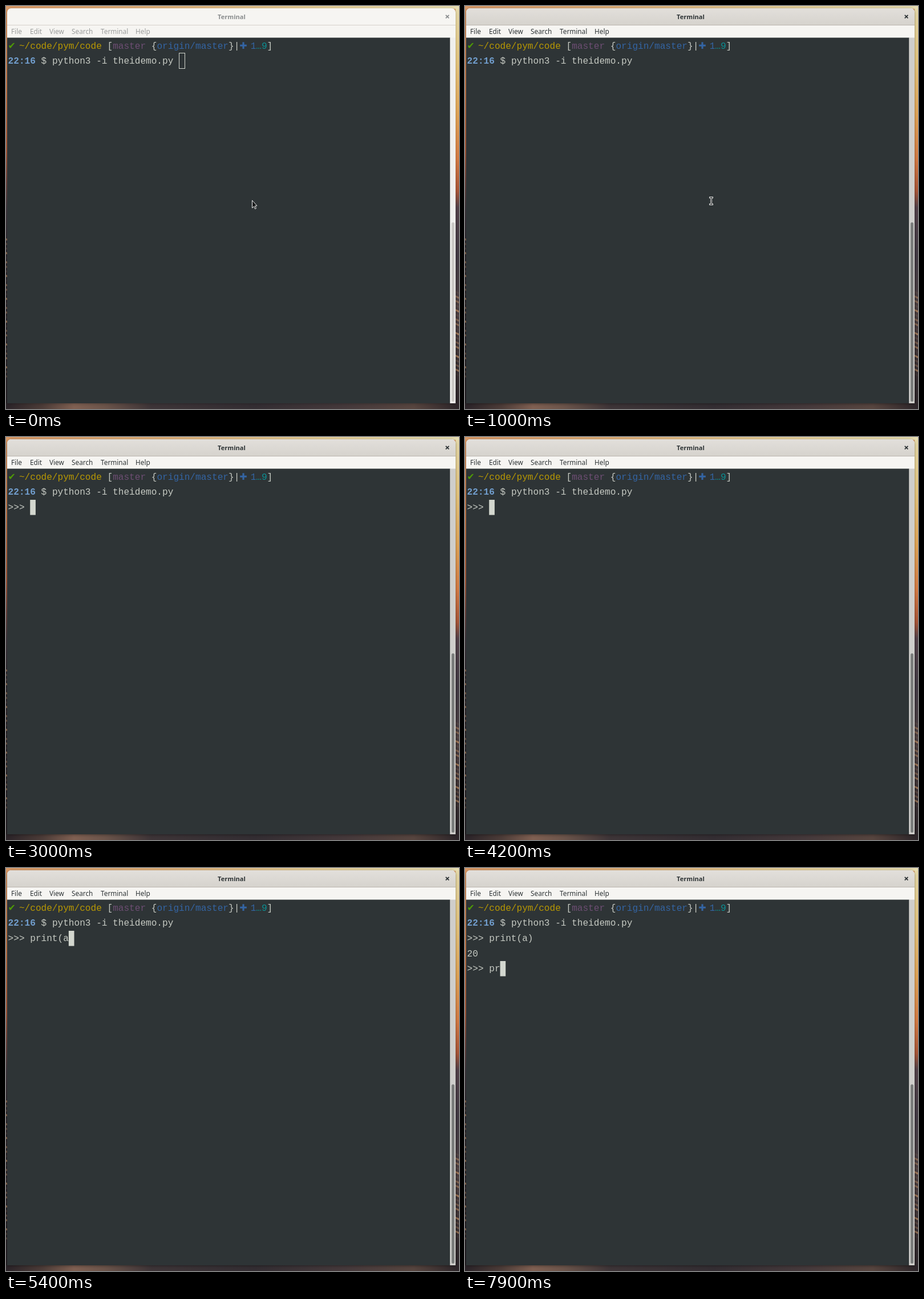
These frames come from a looping animation (794x706 px, 8000 ms). An HTML page with a canvas:

```html
<!DOCTYPE html>
<html lang="en">
<head>
<meta charset="utf-8">
<title>Terminal</title>
<style>
html, body { margin: 0; width: 100%; height: 100%; overflow: hidden; background: #2e3436; }
canvas { display: block; }
</style>
</head>
<body>
<canvas id="stage" width="794" height="706"></canvas>
<script>
const ctx = document.getElementById('stage').getContext('2d');
const W = 794, H = 706, LOOP = 8000;
const CELL = 9.66, LEFT = 3.6, PITCH = 26.67;
const MONO = '16.1px "Liberation Mono", monospace';
const UI = '"Noto Sans", "Open Sans", sans-serif';
const FG = '#c6cac3', CURSOR = '#d3d7cf', BLUE = '#3465a4';

// Time, text typed at the prompt, cursor visible
const STEPS = [
  [1900, '', 1], [2400, '', 0], [3000, '', 1], [3600, '', 0], [4200, '', 1],
  [4400, 'p', 1], [4500, 'pri', 1], [4700, 'prin', 1], [4800, 'print', 1],
  [5000, 'print(', 1], [5400, 'print(a', 1], [5900, 'print(a)', 1],
  [6400, '', 1], [7000, '', 0], [7700, '', 1], [7800, 'p', 1], [7900, 'pr', 1]
];

const colX = c => LEFT + c * CELL;
const rowTop = r => Math.round(56.5 + r * PITCH);
const mix = (a, b, k) => `rgb(${a.map((v, i) => Math.round(v + (b[i] - v) * k))})`;

function rect(x, y, w, h, fill) {
  ctx.fillStyle = fill;
  ctx.fillRect(x, y, w, h);
}

function gradient(x0, y0, x1, y1, stops) {
  const g = ctx.createLinearGradient(x0, y0, x1, y1);
  stops.forEach(([at, color]) => g.addColorStop(at, color));
  return g;
}

function label(str, x, y, font, color, align = 'left') {
  ctx.font = font;
  ctx.fillStyle = color;
  ctx.textAlign = align;
  ctx.fillText(str, x, y);
}

function put(col, row, str, color = FG, font = MONO) {
  label(str, colX(col), Math.round(74.6 + row * PITCH), font, color);
}

// Slanted glints on the water along a side strip
function glints(x, y0, y1) {
  ctx.lineWidth = 3;
  ctx.strokeStyle = '#b98a62';
  for (let y = y0; y < y1; y += 8) {
    ctx.globalAlpha = .4 + .35 * Math.sin(y * .31);
    ctx.beginPath();
    ctx.moveTo(x - 1, y);
    ctx.lineTo(x + 7, y + 4);
    ctx.stroke();
  }
  ctx.globalAlpha = 1;
}

function wallpaper() {
  rect(0, 0, W, H, gradient(0, 0, 0, H, [
    [0, '#dc9a66'], [.2, '#d8824e'], [.36, '#b9623f'], [.43, '#7c4a42'],
    [.5, '#443a42'], [.6, '#2c272e'], [1, '#241f24']]));
  rect(788, 0, 6, H, gradient(0, 0, 0, H, [
    [0, '#e8dcac'], [.14, '#e8c87e'], [.27, '#e4a656'], [.38, '#d87c44'],
    [.46, '#ab5638'], [.5, '#54424a'], [.62, '#423a44'], [.75, '#4a3e40'], [1, '#2b2428']]));
  rect(0, 0, W, 5, gradient(0, 0, W, 0, [
    [0, '#d99a68'], [.35, '#e0b17a'], [.7, '#e6cf98'], [1, '#e8deb2']]));
  rect(0, 696, W, 10, gradient(0, 0, W, 0, [
    [0, '#2a2328'], [.08, '#4c3c38'], [.15, '#806052'], [.22, '#6b544a'], [.32, '#3d3437'],
    [.55, '#332d32'], [.75, '#45393b'], [.9, '#57453f'], [1, '#2b2428']]));
  glints(0, 408, 650);
  glints(788, 500, 650);
}

function frame(focused, k) {
  const ink = focused ? '#2e3436' : '#8b8e8f';
  ctx.save();
  ctx.shadowColor = focused ? 'rgba(0,0,0,.4)' : 'rgba(0,0,0,.28)';
  ctx.shadowBlur = 5;
  ctx.shadowOffsetY = 1;
  ctx.fillStyle = '#f6f5f2';
  ctx.beginPath();
  ctx.roundRect(2, 4, 786, 692, [7, 7, 0, 0]);
  ctx.fill();
  ctx.restore();

  if (focused) {
    ctx.fillStyle = gradient(0, 4, 0, 33, [[0, '#e2dfdb'], [1, '#d6d3cd']]);
    ctx.beginPath();
    ctx.roundRect(2, 4, 786, 29, [7, 7, 0, 0]);
    ctx.fill();
  }
  rect(2, 33, 786, 1, focused ? '#bbb5ae' : '#d5d1cc');
  label('Terminal', 395.5, 23, '600 11.1px ' + UI, ink, 'center');

  ctx.strokeStyle = ink;
  ctx.lineWidth = 1.8;
  ctx.beginPath();
  ctx.moveTo(770.8, 15.8);
  ctx.lineTo(776.4, 21.4);
  ctx.moveTo(776.4, 15.8);
  ctx.lineTo(770.8, 21.4);
  ctx.stroke();

  [['File', 9], ['Edit', 42], ['View', 76], ['Search', 115], ['Terminal', 166], ['Help', 227]]
    .forEach(([name, x]) => label(name, x, 49, '11.8px ' + UI, focused ? ink : '#9b9d9c'));

  rect(2, 55.5, 776.5, 640.5, '#2e3436');
  rect(778.5, 55.5, 9.5, 640.5, mix([240, 239, 237], [207, 206, 203], k));
  ctx.fillStyle = focused ? '#7b7d7c' : '#cbc9c6';
  ctx.beginPath();
  ctx.roundRect(781, 379, 5, 314, 2.5);
  ctx.fill();
}

function cursor(col, row, hollow) {
  const x = colX(col), y = rowTop(row);
  if (!hollow) return rect(x, y, CELL, 26.6, CURSOR);
  ctx.strokeStyle = CURSOR;
  ctx.lineWidth = 1;
  ctx.strokeRect(Math.round(x) + .5, y - .5, 10, 27);
}

function arrow() {
  ctx.beginPath();
  [[431.5, 340.5], [431.5, 354], [434.5, 351], [436.5, 355.5], [438.5, 354.5], [436.5, 350.2], [440, 350]]
    .forEach(([x, y]) => ctx.lineTo(x, y));
  ctx.closePath();
  ctx.fillStyle = '#161819';
  ctx.fill();
  ctx.strokeStyle = '#eeeeee';
  ctx.lineWidth = 1;
  ctx.stroke();
}

function beam() {
  const stroke = (color, width) => {
    ctx.strokeStyle = color;
    ctx.lineWidth = width;
    ctx.beginPath();
    ctx.moveTo(429.5, 335.5);
    ctx.lineTo(433.5, 335.5);
    ctx.moveTo(431.5, 335.5);
    ctx.lineTo(431.5, 347.5);
    ctx.moveTo(429.5, 347.5);
    ctx.lineTo(433.5, 347.5);
    ctx.stroke();
  };
  ctx.lineCap = 'square';
  stroke('#e6e6e6', 2.8);
  stroke('#1b1d1e', 1);
  ctx.lineCap = 'butt';
}

function shell() {
  const symbol = '16px "DejaVu Sans", sans-serif';
  put(0, 0, '✔', '#4e9a06', symbol);
  put(2, 0, '~/code/pym/code', '#b89803');
  put(18, 0, '[');
  put(19, 0, 'master', '#6e4e74');
  put(26, 0, '{');
  put(27, 0, 'origin/master', BLUE);
  put(40, 0, '}|');
  put(42, 0, '✚', BLUE, symbol);
  put(44, 0, '1', BLUE);
  put(45, 0, '…9', '#0b9093');
  put(47, 0, ']');
  put(0, 1, '22:16', '#729fcf', 'bold ' + MONO);
  put(6, 1, '$ python3 -i theidemo.py');
}

function python(t) {
  const [, typed, lit] = STEPS.findLast(s => s[0] <= t);
  const row = t < 6400 ? 2 : 4;
  if (row === 4) {
    put(0, 2, '>>> print(a)');
    put(0, 3, '20');
  }
  put(0, row, '>>> ' + typed);
  if (lit) cursor(4 + typed.length, row);
}

function draw(t) {
  const focused = t >= 400;
  const k = focused ? Math.min(1, (Math.floor(t / 100) - 3) / 5) : 0;
  wallpaper();
  frame(focused, k);
  shell();
  if (t < 100) arrow();
  else if (t < 1800) beam();
  if (t >= 1900) python(t);
  else if (t >= 1800) cursor(0, 2);
  else if (t < 1000 || t >= 1600) cursor(31, 1, !focused);
}

const start = performance.now();
function tick() {
  draw((performance.now() - start) % LOOP);
  requestAnimationFrame(tick);
}
tick();
</script>
</body>
</html>
```
